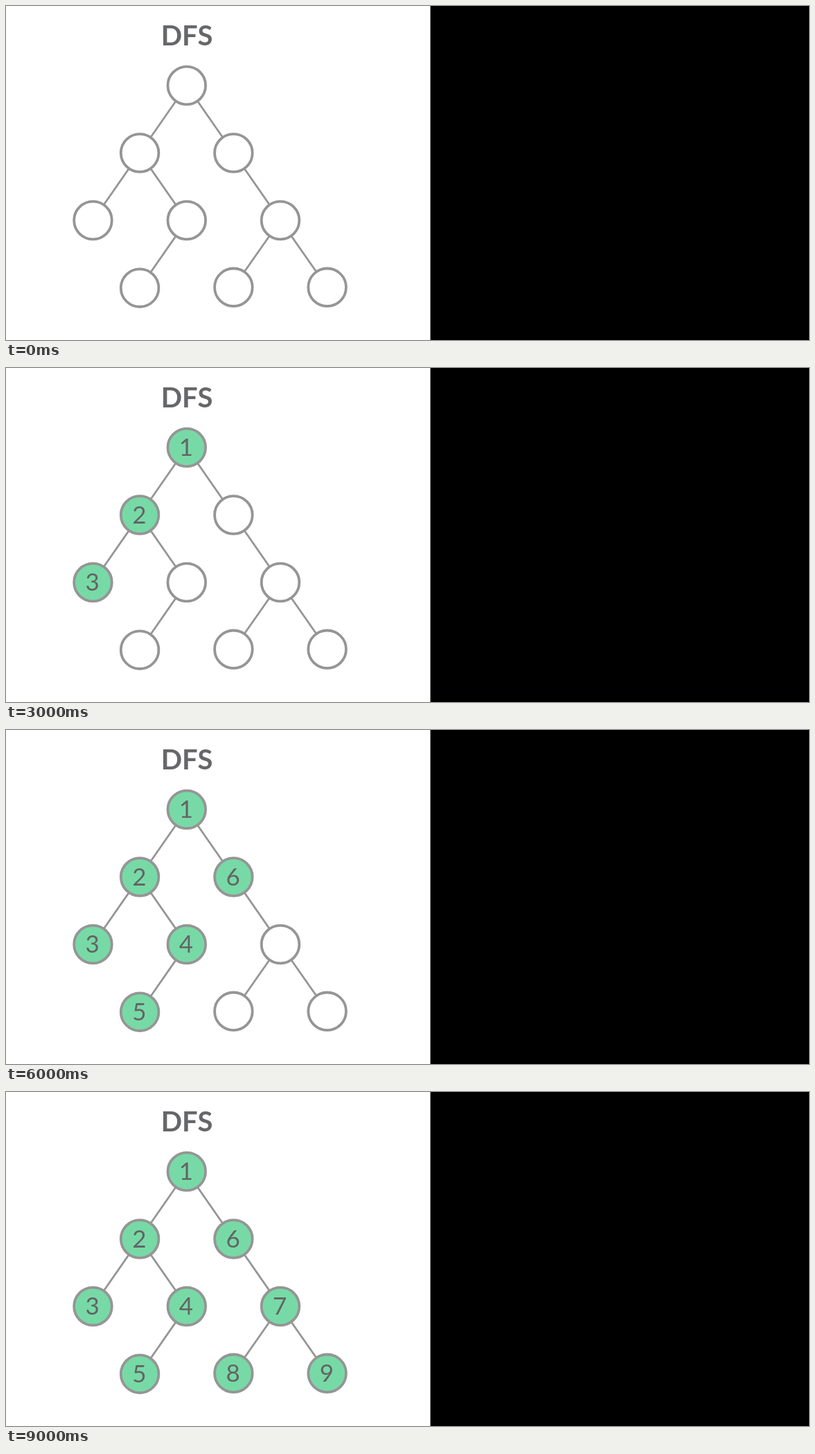
An HTML page that plays this animation: 1159x483 px, repeating every 10 s.

```html
<!DOCTYPE html>
<html lang="en">
<head>
<meta charset="utf-8">
<title>DFS</title>
<style>
  @property --step {
    syntax: '<number>';
    inherits: true;
    initial-value: 0;
  }
  @keyframes visit {
    from { --step: 0; }
    to { --step: 10; }
  }
  html, body { margin: 0; width: 100%; height: 100%; overflow: hidden; background: #fff; }
  svg { display: block; animation: visit 10s steps(10, end) infinite; }
  text { font-family: Lato, sans-serif; fill: #666769; text-anchor: middle; }
  .title { font-size: 40px; font-weight: 700; }
  .digit { font-size: 35px; fill: #636466; }
  .edge { stroke: #959595; stroke-width: 2.8; }
  .disc { fill: #fff; }
  .ring { fill: none; stroke: #959595; stroke-width: 3.8; }
  .mark { opacity: clamp(0, var(--step) - var(--n) + 1, 1); }
  .mark circle { fill: #77daa6; }
</style>
</head>
<body>
<svg width="1159" height="483" viewBox="0 0 1159 483">
  <rect x="612.5" width="546.5" height="483"/>
  <text class="title" x="261" y="57">DFS</text>
  <g id="edges"></g>
  <g id="nodes"></g>
</svg>
<script>
  // x, y, parent index; listed in visiting order
  const tree = [
    [260.8, 115, -1],
    [193.1, 212.5, 0],
    [125.5, 310, 1],
    [260.8, 310, 1],
    [193.1, 407.7, 3],
    [328.4, 212.5, 0],
    [396, 310, 5],
    [328.4, 406.8, 6],
    [463.6, 406.8, 6]
  ];

  function add(parent, tag, attrs) {
    const el = document.createElementNS('http://www.w3.org/2000/svg', tag);
    for (const key in attrs) el.setAttribute(key, attrs[key]);
    return parent.appendChild(el);
  }

  const edges = document.getElementById('edges');
  const nodes = document.getElementById('nodes');

  tree.forEach(([x, y, parent], i) => {
    if (parent >= 0) {
      const [x1, y1] = tree[parent];
      add(edges, 'line', { class: 'edge', x1, y1, x2: x, y2: y });
    }
    const node = add(nodes, 'g', { transform: `translate(${x} ${y})` });
    add(node, 'circle', { class: 'disc', r: 27.3 });
    // becomes visible once the step counter reaches n
    const mark = add(node, 'g', { class: 'mark', style: `--n: ${i + 1}` });
    add(mark, 'circle', { r: 27.3 });
    add(mark, 'text', { class: 'digit', x: -0.8, y: 12 }).textContent = i + 1;
    add(node, 'circle', { class: 'ring', r: 27.3 });
  });
</script>
</body>
</html>
```
